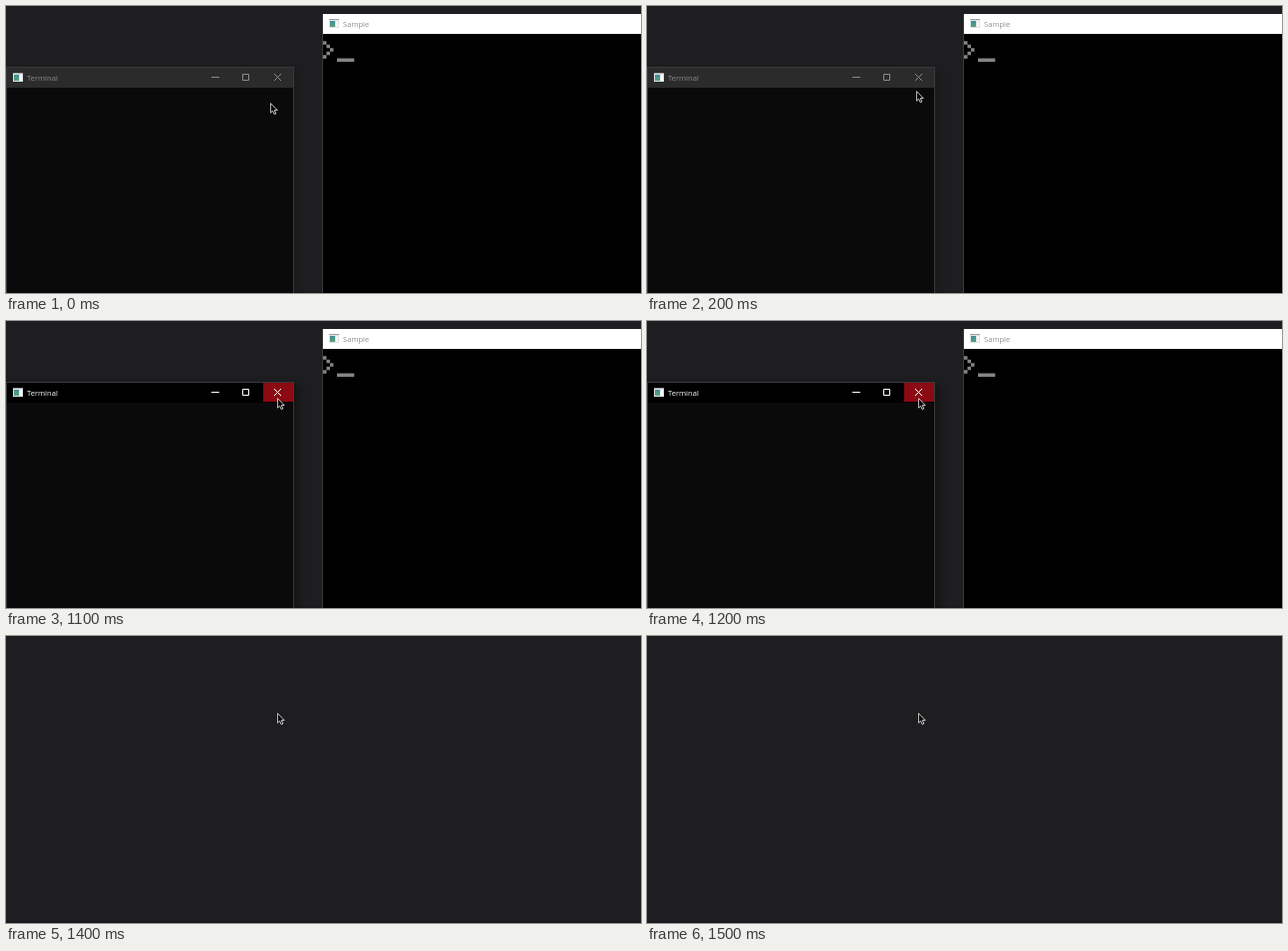
Recreate the animation shown at these times as an HTML page. Size 637 by 288 pixels, loop 2.5 s.

```html
<!DOCTYPE html>
<html lang="en">
<head>
<meta charset="utf-8">
<title>Closing windows</title>
<style>
  html, body { margin: 0; width: 100%; height: 100%; overflow: hidden; background: #1e1e20; }
  svg { display: block; width: 637px; height: 288px; }
  text { font: 7.6px "Open Sans", "Noto Sans", sans-serif; }
  rect { shape-rendering: crispEdges; }

  .terminal, .chrome, .bar, .shadow, .close, .cross, .sample, .pointer {
    animation: 2500ms step-end infinite;
  }
  .terminal { animation-name: vanish; }
  .chrome { animation-name: chrome; }
  .bar { animation-name: bar; }
  .shadow { animation-name: shadow; filter: blur(5px); }
  .close { animation-name: close; }
  .cross { animation-name: cross; }
  .sample { animation-name: leave; }
  .pointer { animation-name: point; }

  @keyframes vanish { 0% { opacity: 1 } 52%, 100% { opacity: 0 } }
  @keyframes chrome { 0% { color: #8b8b8b } 44%, 100% { color: #fff } }
  @keyframes bar { 0% { fill: #2b2b2b } 44%, 100% { fill: #000 } }
  @keyframes shadow { 0% { opacity: .12 } 44%, 100% { opacity: .4 } }
  @keyframes close {
    0% { fill: #e8112300 }
    12% { fill: #e81123b0 }
    16% { fill: #e81123 }
    44%, 100% { fill: #8b0a14 }
  }
  @keyframes cross { 0% { color: #8b8b8b } 12%, 100% { color: #fff } }
  @keyframes leave {
    0% { opacity: 1; transform: none }
    52% { opacity: .54; transform: translate(4px, 4px) }
    56%, 100% { opacity: 0; transform: none }
  }
  @keyframes point {
    0% { transform: translate(265px, 97px) }
    4% { transform: translate(267px, 92px) }
    8% { transform: translate(270px, 85px) }
    12% { transform: translate(271px, 79px) }
    16%, 100% { transform: translate(272px, 77px) }
  }
</style>
</head>
<body>
<svg viewBox="0 0 637 288">
  <defs>
    <linearGradient id="pane" x2="0" y2="1">
      <stop stop-color="#3f8f9a"/>
      <stop offset="1" stop-color="#58a07a"/>
    </linearGradient>
    <g id="icon">
      <rect width="10" height="9" fill="#dfe3e5"/>
      <rect width="10" height="1" fill="#9aa3a8"/>
      <rect x="1" y="2" width="5" height="6" fill="url(#pane)"/>
      <rect x="7" y="2" width="2" height="6" fill="#f8f8f8"/>
    </g>
  </defs>

  <rect width="637" height="288" fill="#1e1e20"/>
  <rect y="286" width="637" height="2" fill="#1b191d"/>

  <g class="sample">
    <rect x="317" y="8" width="1" height="280" fill="#3a3a3c"/>
    <rect x="318" y="8" width="330" height="290" fill="#000"/>
    <rect x="318" y="8" width="330" height="20" fill="#fff"/>
    <use href="#icon" x="324" y="13"/>
    <text x="338" y="20.5" fill="#8f8f8f">Sample</text>
    <path fill="#858585" d="M318 35.3h3.5v3.5h-3.5zM321.5 38.8h3.5v3.5h-3.5zM325 42.3h3.5v3.5h-3.5zM321.5 45.8h3.5v3.5h-3.5zM318 49.3h3.5v3.5h-3.5zM332 52.4h17.3v3.5h-17.3z"/>
  </g>

  <g class="terminal">
    <rect class="shadow" x="-10" y="64" width="303" height="240"/>
    <rect y="61" width="289" height="240" fill="#39393b"/>
    <rect x="1" y="82" width="287" height="206" fill="#0a0a0a"/>
    <rect class="bar" x="1" y="62" width="287" height="20"/>
    <use href="#icon" x="7" y="67"/>
    <g class="chrome">
      <text x="21" y="74.5" fill="currentColor">Terminal</text>
      <g fill="none" stroke="currentColor">
        <path d="M206 71.5h8M237.5 68.5h6v6h-6z"/>
      </g>
    </g>
    <rect class="close" x="258" y="62" width="30" height="19"/>
    <path class="cross" d="M269 68l7 7M276 68l-7 7" fill="none" stroke="currentColor"/>
  </g>

  <path class="pointer" d="M.4 .6V10.2L2.6 8.2L4.2 11.7L5.8 11L4.3 7.6H7.2Z"
        fill="#000" stroke="#fff" stroke-width=".8" stroke-linejoin="round"/>
</svg>
</body>
</html>
```
